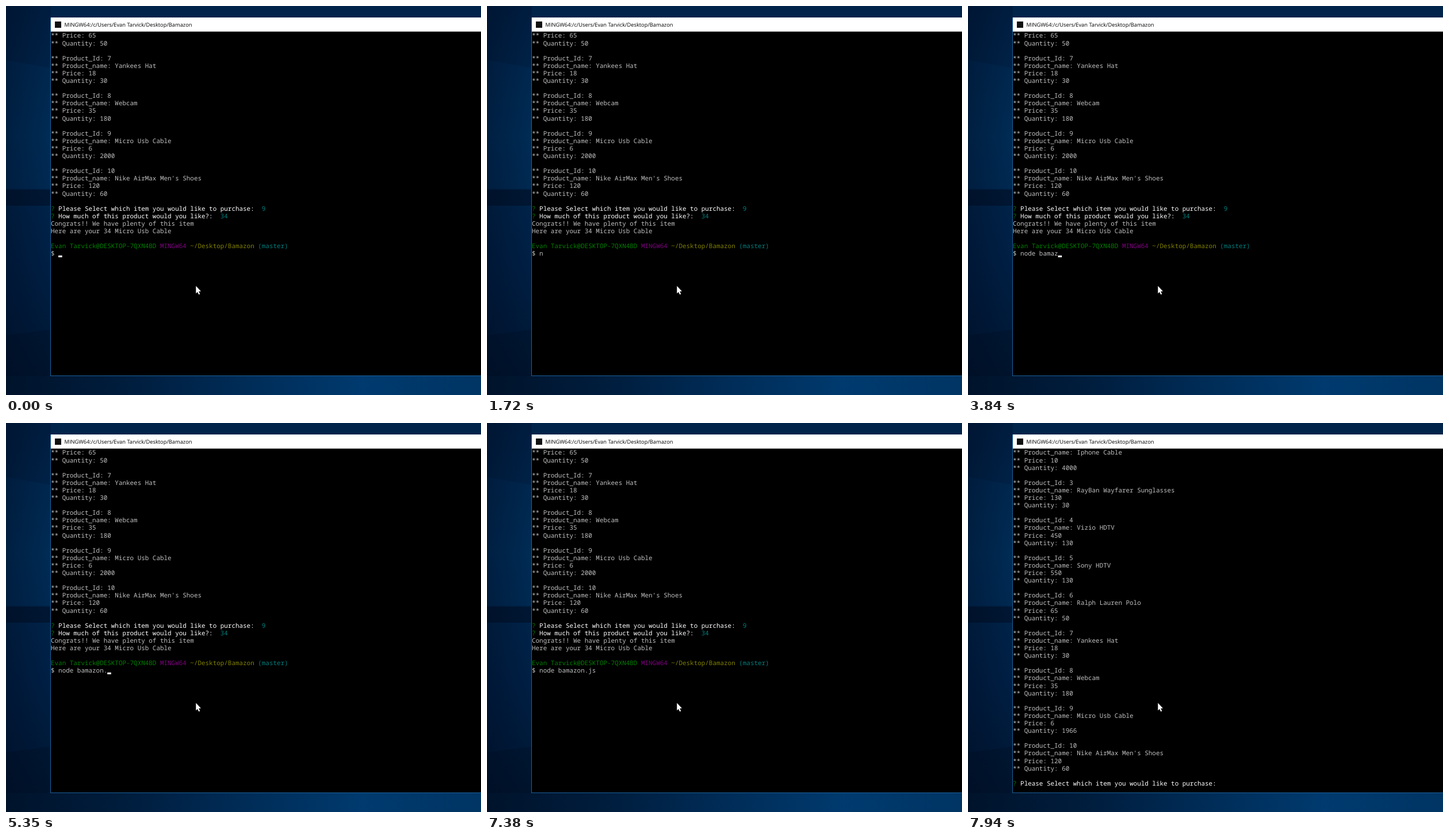
Recreate the animation shown at these times as an HTML page with a canvas. Size 826 px wide and 678 px high, loop 8 s.

```html
<!DOCTYPE html>
<html lang="en">
<head>
<meta charset="utf-8">
<title>Terminal session</title>
<style>
  html, body { margin: 0; width: 100%; height: 100%; overflow: hidden; background: #001a3a; }
  canvas { display: block; }
</style>
</head>
<body>
<canvas id="stage" width="826" height="678"></canvas>
<script>
const ctx = document.getElementById('stage').getContext('2d');
const W = 826, H = 678, LOOP = 8000;
const CELL_W = 6.55, CELL_H = 13.1, LEFT = 78, TOP = 45, BASELINE = 10.4;
const GRAY = '#c0c0c0', WHITE = '#fff', GREEN = '#008000',
      PURPLE = '#800080', OLIVE = '#808000', TEAL = '#008080';

// name, price, quantity; ids count up from 2
const products = [
  ['Iphone Cable', 10, 4000],
  ['RayBan Wayfarer Sunglasses', 130, 30],
  ['Vizio HDTV', 450, 130],
  ['Sony HDTV', 550, 130],
  ['Ralph Lauren Polo', 65, 50],
  ['Yankees Hat', 18, 30],
  ['Webcam', 35, 180],
  ['Micro Usb Cable', 6, 2000],
  ["Nike AirMax Men's Shoes", 120, 60]
];
const BOUGHT = 'Micro Usb Cable', AMOUNT = 34;

// Each line is a list of [colour, text] runs.
const plain = text => [[GRAY, text]];
const ask = (question, answer) =>
  [[GREEN, '? '], [WHITE, question + '  '], [TEAL, answer]];
const PICK = 'Please Select which item you would like to purchase:';

function listing(sold) {
  return products.flatMap(([name, price, quantity], i) => [
    '** Product_Id: ' + (i + 2),
    '** Product_name: ' + name,
    '** Price: ' + price,
    '** Quantity: ' + (name === BOUGHT ? quantity - sold : quantity),
    ''
  ]).map(plain);
}

const before = [
  ...listing(0).slice(22),
  ask(PICK, '9'),
  ask('How much of this product would you like?:', AMOUNT),
  plain('Congrats!! We have plenty of this item'),
  plain(`Here are your ${AMOUNT} ${BOUGHT}`),
  [],
  [[GREEN, 'Evan Tarvick@DESKTOP-7QXN4BD '], [PURPLE, 'MINGW64 '],
   [OLIVE, '~/Desktop/Bamazon '], [TEAL, '(master)']]
];
const after = [...listing(AMOUNT).slice(1), ask(PICK, '')];

// What appears on the command line, and when
const keys = [
  [1440, 'n'], [2160, 'ode'], [2460, ' '], [2740, 'b'], [2860, 'a'],
  [3290, 'm'], [3450, 'a'], [3840, 'z'], [3990, 'on'], [4390, '.'],
  [6060, 'j'], [6180, 's']
];
const ENTER = 6990, RESULT = 7790;
const BLINK = 518.5, BLINK_START = 120, HOLD = 100;

// The cursor toggles on a steady beat; any output lights it again for a moment.
const beat = t => Math.floor((t - BLINK_START) / BLINK);
const cursorOn = (t, last) => t < last + HOLD || (beat(t) - beat(last + HOLD)) % 2 === 0;

function stateAt(t) {
  if (t >= RESULT) return { lines: after, col: PICK.length + 4, row: 44, on: cursorOn(t, RESULT) };
  const pressed = keys.filter(([time]) => time <= t);
  const command = '$ ' + pressed.map(([, text]) => text).join('');
  const lines = [...before, plain(command)];
  if (t >= ENTER) return { lines, col: 0, row: 30, on: cursorOn(t, ENTER) };
  const last = pressed.length ? pressed.at(-1)[0] : 0;
  return { lines, col: command.length, row: 29, on: cursorOn(t, last) };
}

function rect(color, x, y, w, h) {
  ctx.fillStyle = color;
  ctx.fillRect(x, y, w, h);
}

function poly(color, ...points) {
  ctx.fillStyle = color;
  ctx.beginPath();
  points.forEach(([x, y]) => ctx.lineTo(x, y));
  ctx.closePath();
  ctx.fill();
}

// Evenly spaced colours along a line
function gradient(x, y, ...colors) {
  const g = ctx.createLinearGradient(0, 0, x, y);
  colors.forEach((color, i) => g.addColorStop(i / (colors.length - 1), color));
  return g;
}

function drawDesktop() {
  rect(gradient(0, H, '#001d40', '#00284f', '#001f44', '#001630'), 0, 0, LEFT, H);
  poly('rgba(0,60,110,.2)', [0, 94], [78, 108], [78, 318], [0, 318]);
  rect('rgba(0,10,28,.5)', 0, 320, LEFT, 28);
  poly('rgba(0,8,24,.25)', [0, 574], [78, 564], [78, H], [0, H]);
  rect(gradient(LEFT, 0, 'rgba(0,8,28,.35)', 'rgba(0,8,28,0)'), 0, 0, LEFT, H);
  rect('#00244a', LEFT, 0, W - LEFT, 20);
  rect(gradient(W, 0, '#00132b', '#001d3d', '#002c57', '#003a6e', '#003564'), 0, 645, W, H - 645);
}

function drawWindow() {
  rect('#1c619c', 77, 20, W - 77, 625);
  rect('#000', LEFT, 44, W - LEFT, 600);
  rect(WHITE, LEFT, 20, W - LEFT, 24.6);
  rect('#111', 85, 27, 11, 11);
  ctx.font = '9.3px "Open Sans", "Noto Sans", sans-serif';
  ctx.fillStyle = '#000';
  ctx.fillText('MINGW64:/c/Users/Evan Tarvick/Desktop/Bamazon', 101.5, 36);
}

function drawLine(runs, row) {
  let col = 0;
  for (const [color, text] of runs) {
    ctx.fillStyle = color;
    for (const ch of String(text)) {
      ctx.fillText(ch, LEFT + col++ * CELL_W, TOP + row * CELL_H + BASELINE);
    }
  }
}

function drawCursor(col, row) {
  rect(WHITE, LEFT + col * CELL_W, TOP + (row + 1) * CELL_H - 3.2, CELL_W, 3.2);
}

function drawPointer() {
  poly(WHITE, [330.3, 488], [330.3, 501], [333.1, 498.4], [335.3, 503],
    [337.3, 502], [335.2, 497.6], [339, 497.3]);
}

function draw(t) {
  const { lines, col, row, on } = stateAt(t);
  drawDesktop();
  drawWindow();
  ctx.font = '500 10.917px "Noto Sans Mono", "DejaVu Sans Mono", monospace';
  lines.forEach(drawLine);
  if (on) drawCursor(col, row);
  drawPointer();
}

ctx.textRendering = 'geometricPrecision';
const start = performance.now();
function tick() {
  draw((performance.now() - start) % LOOP);
  requestAnimationFrame(tick);
}
tick();
</script>
</body>
</html>
```
